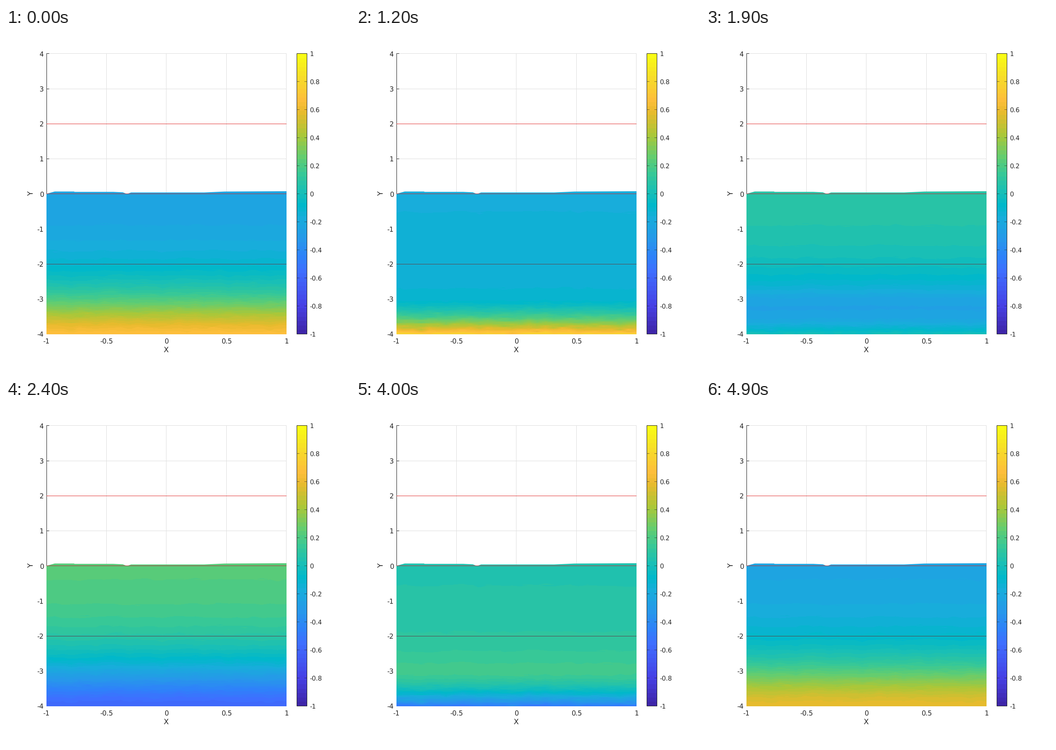
Recreate the animation shown at these times as a matplotlib script. Size 748 px wide and 748 px high, loop 5000 ms.

```python
import numpy as np
import matplotlib.pyplot as plt
from matplotlib.animation import FuncAnimation
from matplotlib.colors import LinearSegmentedColormap
from matplotlib.patches import Polygon, Rectangle

SIZE, FRAMES, DPI = 748, 50, 100
LEFT, RIGHT, TOP, BOTTOM = 88, 610, 56, 666
ZERO, UNIT = 360.75, 76.19          # pixel row of Y = 0, pixels per unit
WATER_TOP = 354
INK, GRID, RED = "#262626", "#dfdfdf", "#e23b3b"
TICK_SIZE, BAR_SIZE, NAME_SIZE = 14.6, 13.7, 16

plt.rcParams.update({"font.family": "DejaVu Sans", "text.hinting": "none"})

# Key colours by level, 0 to 63
KEY_COLORS = {0: "#3e26a8", 6: "#4741e5", 14: "#3e6fff", 17: "#2f81fa",
              21: "#2797eb", 26: "#18addb", 29: "#01b8ca", 32: "#19bfb6",
              36: "#37c897", 40: "#64cd6f", 45: "#abc739", 50: "#e6bb2d",
              53: "#febe3c", 58: "#f7dc2a", 63: "#f9fb15"}
parula = LinearSegmentedColormap.from_list(
    "parula", [(level / 63, color) for level, color in KEY_COLORS.items()], N=64)


def mesh_depths():
    """Depth of every water pixel, jittered like an irregular mesh."""
    rng = np.random.default_rng(4)
    cols = np.arange(LEFT, RIGHT) + .5
    rows = np.arange(WATER_TOP, BOTTOM) + .5
    knots = np.linspace(LEFT, RIGHT, 30)
    strips = (rows - WATER_TOP).astype(int) // 4

    def noise(spread):
        return np.interp(cols, knots, rng.normal(0, spread, knots.size))

    jitter = np.array([noise(.02) for _ in range(strips.max() + 1)])[strips]
    depth = (rows - ZERO)[:, None] / UNIT
    return np.clip(depth + jitter + noise(.01), 0, 4)


def amplitude(depth):
    """Complex amplitude: a uniform drift plus the wave driven by the floor."""
    size = .03 * depth**2 * (1 + 1.65 * (depth / 4)**3.2)
    lead = .78 - .72 * np.maximum(depth - 3, 0)
    return -.27 - .08j + size * np.exp(1j * lead)


wave = amplitude(mesh_depths())


def velocity(frame):
    return (wave * np.exp(2j * np.pi * (frame + 6) / FRAMES)).imag


fig = plt.figure(figsize=(SIZE / DPI, SIZE / DPI), dpi=DPI, facecolor="white")
ax = fig.add_axes([0, 0, 1, 1])
ax.axis("off")


def line(x0, y0, x1, y1, color=INK, z=3, alpha=1):
    ax.plot([x0, x1], [y0, y1], color=color, lw=.72, zorder=z, alpha=alpha,
            solid_capstyle="butt", snap=False)


def label(x, y, text, size, ha):
    ax.text(x, y + .365 * size, text, fontsize=size * .72, color=INK,
            ha=ha, va="baseline")


def row(value):
    return int(ZERO - value * UNIT) + .5


def bands(values, extent):
    return ax.imshow(values, cmap=parula, vmin=-1, vmax=1, extent=extent,
                     interpolation="nearest", aspect="auto", zorder=2)


# Axes and grid
for i in range(5):
    x = 88 + 130.4 * i
    line(int(x) + .5, TOP, int(x) + .5, BOTTOM, GRID, 1)
    label(x, 680.5, f"{i / 2 - 1:g}", TICK_SIZE, "center")
for value in range(-4, 5):
    label(82, ZERO - value * UNIT + .5, str(value), TICK_SIZE, "right")
    if value > 0:
        line(LEFT, row(value), RIGHT, row(value), GRID, 1)
        line(LEFT, row(value), 94, row(value))
line(88.5, TOP, 88.5, ZERO, z=1.5)
label(348.5, 699.5, "X", NAME_SIZE, "center")
ax.text(59, 360.5, "Y", fontsize=NAME_SIZE * .72, color=INK, rotation=90,
        rotation_mode="anchor", ha="center", va="baseline")

# Water with its slightly uneven surface
SURFACE = [(88, 360.5), (106, 355.5), (148, 355.5), (149, 356.3), (233, 356.3),
           (254, 357.3), (263, 361), (272, 357.6), (431, 357.6), (475, 355.6),
           (610, 354.9)]
water = bands(velocity(0), (LEFT, RIGHT, BOTTOM, WATER_TOP))
water.set_clip_path(Polygon(SURFACE + [(RIGHT, BOTTOM), (LEFT, BOTTOM)],
                            transform=ax.transData))
for value, color in ((2, RED), (0, "#b8343c"), (-2, "#5c4850")):
    line(LEFT, row(value), RIGHT, row(value), color, 4)

# Colour bar
bands(np.linspace(1, -1, 64)[:, None], (633, 655, BOTTOM, TOP))
ax.add_patch(Rectangle((632.5, 55.5), 22, 610, fill=False, ec=INK, lw=.72,
                       zorder=3, snap=False))
for i in range(11):
    y = 55.9 + 60.95 * i
    for x in (633, 649):
        line(x, int(y) + .5, x + 5, int(y) + .5, alpha=.6)
    label(660, y + .3, f"{(5 - i) / 5:g}", BAR_SIZE, "left")

ax.set_xlim(0, SIZE)
ax.set_ylim(SIZE, 0)


def update(frame):
    water.set_data(velocity(frame))
    return (water,)


anim = FuncAnimation(fig, update, frames=FRAMES, interval=100, repeat=True,
                     repeat_delay=0, blit=False)
plt.show()
```
